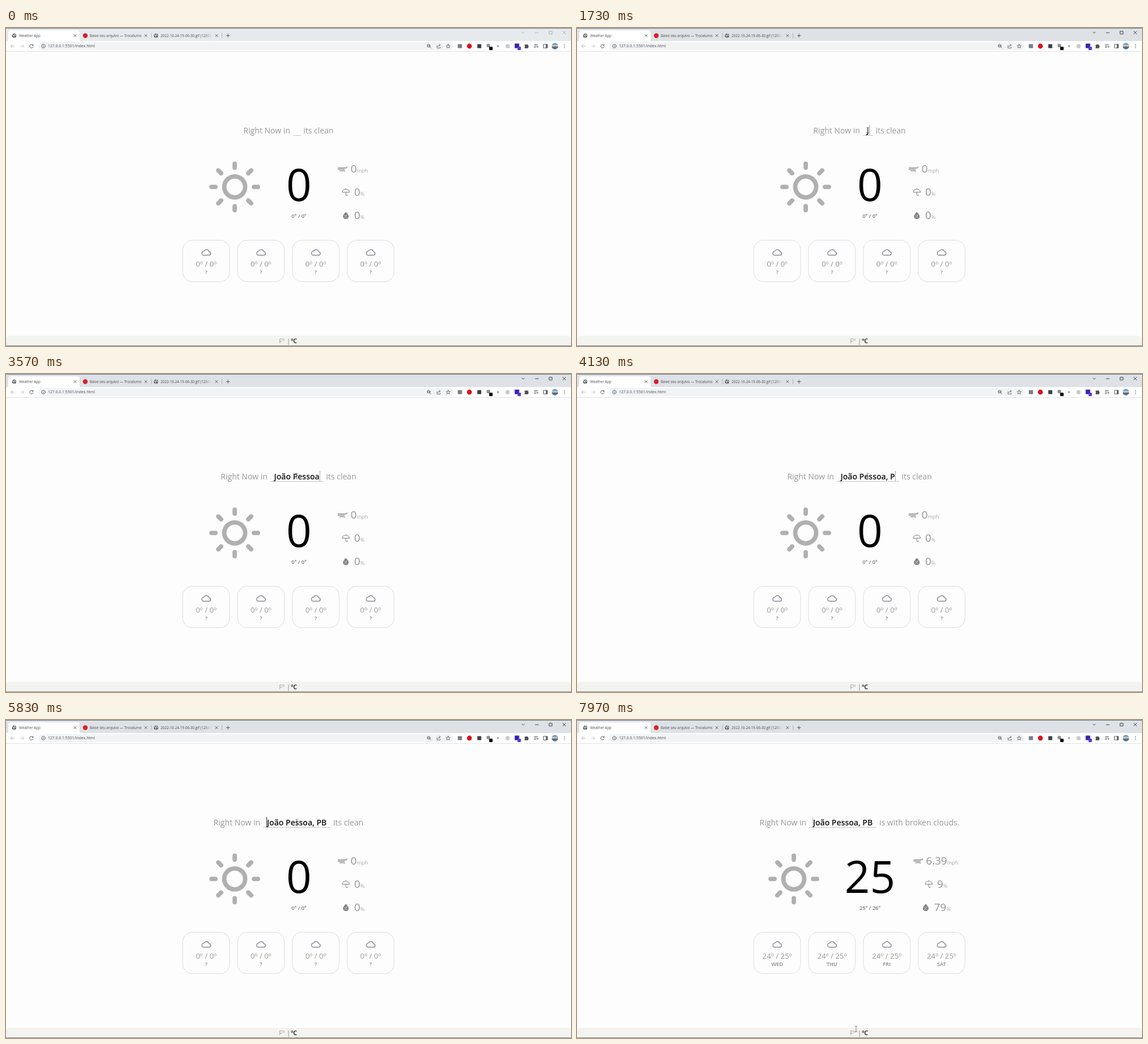
An HTML page for the animation above (8000 ms loop, 998 by 561 pixels).

```html
<!DOCTYPE html>
<html lang="en">
<head>
<meta charset="utf-8">
<title>Weather App</title>
<style>
  html, body { margin: 0; width: 100%; height: 100%; overflow: hidden; background: #fdfdfd; }
  body, svg text { font-family: "Open Sans", "Noto Sans", sans-serif; }
  svg { position: absolute; left: 0; top: 0; display: block; }
  #heading {
    position: absolute; left: 0; top: 171px; width: 998px; height: 19px;
    font-size: 14.04px; line-height: 19px; color: #989898;
    text-align: center; white-space: pre;
  }
  #city {
    display: inline-block; position: relative; height: 19px; margin: 0 1px; padding: 0 7px;
    vertical-align: top; font-weight: 600; color: #111; white-space: pre;
  }
  #city::after {
    content: ""; position: absolute; left: 0; right: 0; bottom: 0; height: 1px; background: #c6c5c2;
  }
  #caret { position: absolute; top: 0; width: 1px; height: 18px; }
  .line { fill: none; stroke-linecap: round; stroke-linejoin: round; }
</style>
</head>
<body>
<svg width="998" height="561" viewBox="0 0 998 561">
  <defs>
    <linearGradient id="photo" x2="0" y2="1">
      <stop offset=".2" stop-color="#5f9fd0"/><stop offset=".5" stop-color="#e8d9c8"/>
      <stop offset=".6" stop-color="#8a5a3c"/><stop offset=".8" stop-color="#3f7ca8"/>
    </linearGradient>
    <linearGradient id="fade">
      <stop offset=".85" stop-color="#dee1e6" stop-opacity="0"/><stop offset="1" stop-color="#dee1e6"/>
    </linearGradient>
    <g id="globe">
      <circle r="3.8" fill="#5f6368"/>
      <path d="M-2.8-1.2 0-.6-.8 1.2 0 2.8M.6-2.8 1.4-.8 3 0" class="line" stroke="#fff" stroke-width="1"/>
    </g>
    <path id="close" d="M-2-2 2 2M2-2-2 2" class="line" stroke="#4a4d51" stroke-width=".9"/>
    <path id="cloud" class="line" stroke="#8c8c98" stroke-width="1.4"
      d="M-5 5H4.6A3.1 3.1 0 0 0 5-1.2 4.8 4.8 0 0 0-3.8-2.4 3.8 3.8 0 0 0-5 5Z"/>
    <path id="wind" class="line" stroke="#929292" stroke-width="1.4"
      d="M0-1.6H14.5Q16-1.7 15.6-3.6M0 1H11.5M3 3.4H10Q12 3.5 11.6 4.6"/>
    <g id="umbrella" class="line" stroke="#929292" stroke-width="1.2">
      <path d="M0 0A6.3 5.3 0 0 1 12.6 0ZM6.3-5.3V-6.2M6.3 0V4.2Q6.4 6 8 6 9.2 5.8 9.2 4.6"/>
    </g>
    <g id="drop">
      <path d="M5-6.3Q10-1 10 1.6A5 4.6 0 0 1 0 1.6Q0-1 5-6.3Z" fill="#7c7c7c"/>
      <path d="M3 3.4 7-1.2M3-.6H3.8M6.4 3H7" class="line" stroke="#fff" stroke-width="1"/>
    </g>
  </defs>

  <!-- browser window -->
  <rect id="titlebar" width="998" height="24"/>
  <path d="M0 24Q4 24 4 20V8Q4 4 8 4H126Q130 4 130 8V20Q130 24 134 24Z" fill="#fff"/>
  <rect y="23" width="998" height="18" fill="#fff"/>
  <rect y="41" width="998" height=".8" fill="#dcdee0"/>
  <rect width="998" height=".8" fill="#555b66"/>
  <rect x="57" y="25" width="733" height="14" rx="7" fill="#f1f3f4"/>
  <use href="#globe" x="14.5" y="13.5"/>
  <circle cx="140" cy="13.5" r="4.2" fill="#d8202a"/>
  <use href="#globe" x="265" y="13.5"/>
  <g font-size="6.24" fill="#4c4f54">
    <text x="23" y="16">Weather App</text>
    <text x="148" y="16">Baixe seu arquivo — Trocalumo</text>
    <svg x="273" y="0" width="90" height="23"><text y="16">2022-10-24-19-06-30.gif (1280x</text></svg>
    <rect x="273" y="8" width="90" height="11" fill="url(#fade)"/>
    <text x="74" y="34.4" font-size="6.85">127.0.0.1:5501/index.html</text>
  </g>
  <use href="#close" x="122" y="13.5"/><use href="#close" x="247" y="13.5"/><use href="#close" x="372" y="13.5"/>
  <path d="M257 9V18M381.5 9V18" stroke="#9a9da2" stroke-width=".7"/>
  <g class="line" stroke="#55585d" stroke-width="1">
    <path d="M389.2 13.5H395M392.1 10.6V16.4"/>
    <path d="M14.5 32H8.5M11.3 29 8.4 32 11.3 35" stroke="#b4b6b9"/>
    <path d="M25.5 32H31.5M28.7 29 31.6 32 28.7 35" stroke="#c6c8ca"/>
    <path d="M47.6 30.4A3.1 3.1 0 1 0 48 33M48 28.8V30.8H46"/>
    <circle cx="66" cy="32" r="3.3" stroke-width=".8"/><path d="M66 31.8V33.7M66 30.3V30.4"/>
    <circle cx="746.5" cy="31.3" r="2.5"/><path d="M748.5 33.3 750.4 35.2M745.4 31.3H747.6"/>
    <path d="M761.2 31V35.4H767V33.6M762.8 33Q763 30.4 766 30.2M765 28.4 767.4 30.2 765 32" stroke-width=".8"/>
    <path d="M781 28.4 782 31 784.6 31.1 782.6 32.8 783.3 35.3 781 33.9 778.7 35.3 779.4 32.8 777.4 31.1 780 31Z" stroke-width=".8"/>
    <path d="M933 29.5H939M933 32H937M933 34.4H935.6M938.3 34.6V32.2L940.2 33.2"/>
    <path d="M949.8 28.8H956.2V35.2H949.8Z"/>
  </g>
  <rect x="798" y="28.5" width="7.5" height="7" fill="#7b7e83"/>
  <circle cx="818.5" cy="32" r="4.4" fill="#d9121e"/>
  <rect x="832.5" y="28.5" width="7" height="7" fill="#3c3f43"/>
  <circle cx="852" cy="31" r="3.2" fill="#8d9196"/>
  <rect x="853.5" y="33" width="6" height="6" rx="1" fill="#000"/>
  <circle cx="869" cy="32" r="2" fill="#a9acb0"/>
  <circle cx="886" cy="32" r="3.8" fill="#c8cacd"/>
  <rect x="898.5" y="27.5" width="8" height="8" fill="#3a22a8"/>
  <rect x="903.5" y="33" width="6" height="6" rx="1" fill="#5b35d8"/>
  <path d="M916 29.6H918.3A1.4 1.4 0 0 1 920.9 29.6H922.4V31.5A1.4 1.4 0 0 1 922.4 34V35.8H916V33.8A1.2 1.2 0 0 0 916 31.6Z" fill="#4b4e53"/>
  <rect x="953.6" y="28.8" width="2.6" height="6.4" fill="#55585d"/>
  <circle cx="969.6" cy="32" r="5.8" fill="url(#photo)"/>
  <g fill="#55585d"><circle cx="986.6" cy="29.3" r=".8"/><circle cx="986.6" cy="32" r=".8"/><circle cx="986.6" cy="34.7" r=".8"/></g>
  <g id="controls" class="line" stroke-width=".9">
    <path d="M911.3 7 913.5 9.2 915.7 7M935 8.3H940.4M959.6 5.7H964.6V10.7H959.6ZM983.4 5.5 988.6 10.7M988.6 5.5 983.4 10.7"/>
  </g>

  <!-- page -->
  <g id="before"></g>
  <g id="after"></g>
  <path d="M0 561V549Q0 543 6 543H992Q998 543 998 549V561Z" fill="#f3f3ef"/>
  <g font-size="10.92">
    <text x="482.3" y="555.6" fill="#989898">Fº</text>
    <text x="496" y="555.6" fill="#777">|</text>
    <text x="503.2" y="555.6" fill="#111" font-weight="600">ºC</text>
  </g>
  <rect y="560.2" width="998" height=".8" fill="#6a6f78"/>
</svg>

<div id="heading">Right Now in <span id="city"><span id="typed"></span><i id="caret"></i></span> <span id="sky"></span></div>

<svg width="998" height="561" viewBox="0 0 998 561">
  <g id="pointer" class="line" stroke="#74747c" stroke-width=".9">
    <path d="M-1.8-5Q0-5 0-4 0-5 1.8-5M0-4V4M-1.8 5Q0 5 0 4 0 5 1.8 5"/>
  </g>
</svg>

<script>
const LOOP = 8000, FOCUS = 700, ENTER = 5350, LOADED = 6800, BLINK = 530;
const CITY = "João Pessoa, PB";
const keyTimes = [1500, 1750, 2100, 2280, 2450, 2650, 2800, 2930, 3050, 3200, 3400, 3620, 3720, 3800, 4930];
const pointerPath = [[0, 513.5, 180], [7050, 513.5, 180], [7600, 500, 488], [7900, 493, 545], [LOOP, 493, 545]];
const $ = id => document.getElementById(id);

const label = (x, y, size, fill, text, extra = 'text-anchor="middle"') =>
  `<text x="${x}" y="${y}" font-size="${size}" fill="${fill}" ${extra}>${text}</text>`;

function sun(x) {
  let rays = "";
  for (let a = 0; a < 360; a += 45) rays += `<path d="M34 0H41" transform="rotate(${a})"/>`;
  return `<g transform="translate(${x} 280.3)" class="line" stroke="#b0b0b0" stroke-width="7.8"><circle r="18.5"/>${rays}</g>`;
}

function detail([icon, iconX, textX, value, unit], row) {
  const y = 248.3 + row * 41.3;
  const unitSpan = `<tspan font-size="9.36" fill="#aaa">${unit}</tspan>`;
  return `<use href="#${icon}" x="${iconX}" y="${y}"/>` +
    label(textX, y + 6.4, 18.72, "#929292", value + unitSpan, "");
}

function card(range, day, i) {
  const x = 353.6 + i * 96.8;
  return `<rect x="${x - 41.4}" y="374.5" width="82.8" height="73" rx="17" fill="none" stroke="#d3d3de" stroke-width=".8"/>` +
    `<use href="#cloud" x="${x}" y="395.8"/>` +
    label(x, 420.8, 13.26, "#999", range) +
    label(x, 434.4, 9.36, "#888", day, 'text-anchor="middle" font-weight="600"');
}

function weather({ sunX, temp, range, details, cardRange, days }) {
  return sun(sunX) + label(517.4, 304.8, 78, "#000", temp) +
    label(517.5, 335.3, 9.36, "#777", range, 'text-anchor="middle" font-weight="600"') +
    details.map(detail).join("") + days.map((day, i) => card(cardRange, day, i)).join("");
}

$("before").innerHTML = weather({
  sunX: 404, temp: "0", range: "0º / 0º", cardRange: "0º / 0º", days: ["?", "?", "?", "?"],
  details: [["wind", 586.5, 608.7, "0", "mph"], ["umbrella", 594, 615, "0", "%"], ["drop", 595.3, 615, "0", "%"]]
});
$("after").innerHTML = weather({
  sunX: 383, temp: "25", range: "25º / 26º", cardRange: "24º / 25º", days: ["WED", "THU", "FRI", "SAT"],
  details: [["wind", 595, 616.6, "6.39", "mph"], ["umbrella", 615, 636, "9", "%"], ["drop", 611, 630.8, "79", "%"]]
});

const show = (id, on) => { $(id).style.display = on ? "" : "none"; };

function setText(id, text) {
  if ($(id).textContent !== text) $(id).textContent = text;
}

function pointerAt(t) {
  const i = pointerPath.findIndex(p => p[0] > t);
  const [t0, x0, y0] = pointerPath[i - 1], [t1, x1, y1] = pointerPath[i];
  const k = (t - t0) / (t1 - t0), e = k * k * (3 - 2 * k);
  return [x0 + (x1 - x0) * e, y0 + (y1 - y0) * e];
}

function draw(t) {
  const focused = t >= FOCUS, loaded = t >= LOADED, entered = t >= ENTER;
  const count = keyTimes.filter(k => k <= t).length;
  const lastInput = entered ? ENTER : count ? keyTimes[count - 1] : FOCUS;

  $("titlebar").setAttribute("fill", focused ? "#dee1e6" : "#e7eaed");
  $("controls").setAttribute("stroke", focused ? "#33363a" : "#a9acb0");
  show("before", !loaded);
  show("after", loaded);
  setText("typed", CITY.slice(0, count));
  setText("sky", loaded ? "is with broken clouds." : "its clean");

  const caret = $("caret").style;
  show("caret", focused && Math.floor((t - lastInput) / BLINK) % 2 === 0);
  caret.left = entered ? "6px" : "";
  caret.background = loaded ? "#b8b8b8" : entered || !count ? "#222" : "#a4a8b4";

  show("pointer", focused);
  $("pointer").setAttribute("transform", `translate(${pointerAt(t).join(" ")})`);
}

const start = performance.now();
function tick(now) {
  draw(Math.max(0, now - start) % LOOP);
  requestAnimationFrame(tick);
}
draw(0);
requestAnimationFrame(tick);
</script>
</body>
</html>
```
